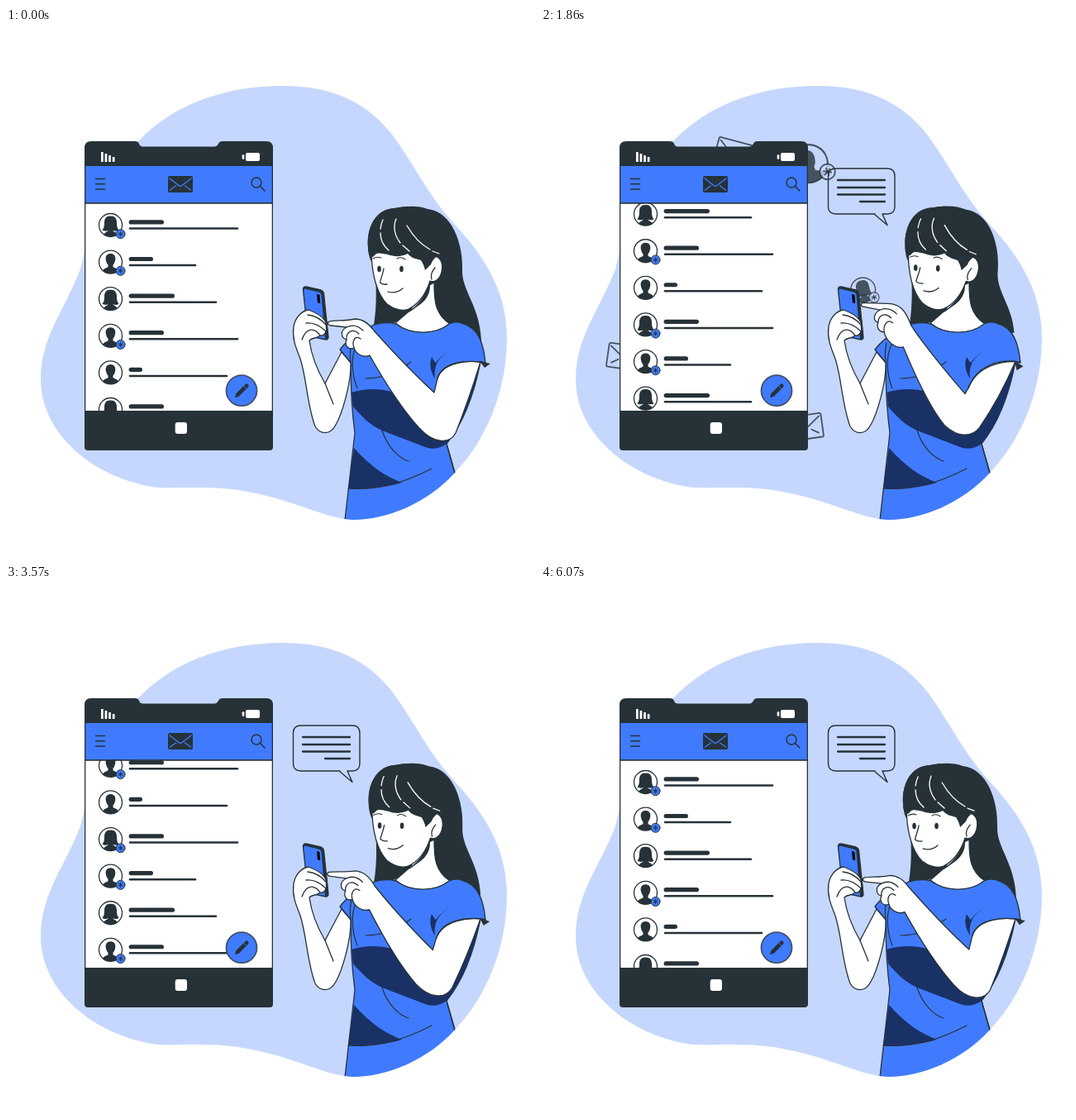
An HTML page with a canvas that plays this animation: 640 px wide and 640 px high, repeating every 6210 ms.

```html
<!DOCTYPE html>
<html lang="en">
<head>
<meta charset="utf-8">
<title>Mail app</title>
<style>
html, body { margin: 0; width: 100%; height: 100%; overflow: hidden; background: #fff; }
canvas { display: block; width: 640px; height: 640px; }
</style>
</head>
<body>
<canvas id="stage"></canvas>
<script>
const LOOP = 6210, FPS = 14, LAST = 85;
const DARK = '#263238', BLUE = '#407bff', PALE = '#c6d7ff', NAVY = '#1a3166', WHITE = '#fff';

const canvas = document.getElementById('stage');
const dpr = window.devicePixelRatio || 1;
canvas.width = canvas.height = 640 * dpr;
const c = canvas.getContext('2d');
c.lineCap = c.lineJoin = 'round';

const lerp = (a, b, k) => a + (b - a) * k;
const clamp = v => Math.max(0, Math.min(1, v));
const easeSine = v => (1 - Math.cos(Math.PI * clamp(v))) / 2;

function fill(d, color) {
  c.fillStyle = color;
  c.fill(typeof d === 'string' ? new Path2D(d) : d);
}
function line(d, width = 1.3, color = DARK) {
  c.strokeStyle = color;
  c.lineWidth = width;
  c.stroke(typeof d === 'string' ? new Path2D(d) : d);
}
function shape(d, color, width = 1.3) {
  fill(d, color);
  line(d, width);
}
function circle(x, y, r) {
  const p = new Path2D();
  p.arc(x, y, r, 0, 7);
  return p;
}
function box(x, y, w, h, r) {
  const p = new Path2D();
  p.roundRect(x, y, w, h, r);
  return p;
}
function group(draw, x = 0, y = 0, turn = 0, size = 1) {
  c.save();
  c.translate(x, y);
  c.rotate(turn * Math.PI / 180);
  c.scale(size, size);
  draw();
  c.restore();
}
// Blend two paths that share the same commands
function blend(a, b, k) {
  const to = b.match(/-?[\d.]+/g);
  let i = 0;
  return a.replace(/-?[\d.]+/g, n => lerp(+n, +to[i++], k).toFixed(2));
}

const BLOB = new Path2D('M335 70C395 70 437 90 468 130C497 170 509 200 544 239C585 283 606 325 606 375C606 440 580 500 543 538C510 575 460 595 420 595C388 594 352 573 302 563C258 553 225 557 185 556C118 549 42 498 42 425C42 374 70 343 90 292C105 230 115 185 160 137C200 95 260 70 335 70Z');

function badge(x, y, r, color, width) {
  shape(circle(x, y, r), color, width);
  for (let i = 0; i < 3; i++) {
    const a = Math.PI * (i / 3 + .5), dx = Math.cos(a) * r * .5, dy = Math.sin(a) * r * .5;
    line(`M${x - dx} ${y - dy}L${x + dx} ${y + dy}`, width);
  }
}

// Avatar drawn at radius 14
function avatar(female, ground) {
  const rim = circle(0, 0, 14);
  if (ground) fill(rim, ground);
  c.save();
  c.clip(rim);
  if (female) {
    fill('M0 -11C5 -11.500 7.500 -8 7.500 -3C7.500 1 8 4 10 6C8 7.500 5 7.500 3 6.500L-3 6.500C-5 7.500 -8 7.500 -10 6C-8 4 -7.500 1 -7.500 -3C-7.500 -8 -5 -11.500 0 -11Z', DARK);
    fill('M-9 14C-9 10 -6 9 -3 7L-3 5L3 5L3 7C6 9 9 10 9 14Z', DARK);
  } else {
    fill('M0 -10C5 -10 6.5 -6 5.6 -2C5 1 4 2.5 3 3.5L3 6C6 8 10 8 10 14L-10 14C-10 8 -6 8 -3 6L-3 3.5C-4 2.5 -5 1 -5.6 -2C-6.5 -6 -5 -10 0 -10Z', DARK);
  }
  c.restore();
  line(rim, 1.3);
}

const ROWS = [
  { female: true, star: true, title: 191, text: 281 },
  { female: false, star: true, title: 178, text: 230 },
  { female: true, star: false, title: 204, text: 255 },
  { female: false, star: true, title: 191, text: 281 },
  { female: false, star: false, title: 165, text: 268 }
];
const STEP = 44.6, SPAN = STEP * ROWS.length, PAUSE = 102.7;

function list(t) {
  const scroll = PAUSE * easeSine(t / 1900) + (SPAN - PAUSE) * easeSine((t - 2340) / 2720);
  c.save();
  c.beginPath();
  c.rect(96, 212, 226, 251);
  c.clip();
  for (let i = 0; i < 12; i++) {
    const y = 238.5 + i * STEP - scroll, row = ROWS[i % 5];
    if (y < 190 || y > 485) continue;
    group(() => avatar(row.female, WHITE), 126.5, y);
    if (row.star) badge(138.6, y + 10.7, 5.5, BLUE, 1);
    line(`M151.2 ${y - 3.6}H${row.title - 2.6}`, 5.2);
    line(`M150 ${y + 4}H${row.text - 1}`, 2.5);
  }
  c.restore();
}

function bigPhone(t) {
  fill('M95 145Q95 137 103 137H156Q160 137 161 140Q162 143.500 166 143.500H252Q255 143.500 257 140Q258 137 262 137H315Q323 137 323 145V507Q323 511 319 511H99Q95 511 95 507Z', DARK);
  fill('M96.300 212H321.700V463H96.300Z', WHITE);
  list(t);
  fill('M96.300 167H321.700V211.500H96.300Z', BLUE);
  line('M96 212H322', 1.3);
  for (let i = 0; i < 4; i++) fill(box(115 + i * 4.6, 150 + i * 2, 2.7, 12 - i * 2, .6), WHITE);
  fill(box(290, 151, 17, 10, 2), WHITE);
  fill(box(285.7, 153.3, 2.6, 5.4, 1), WHITE);
  line('M108.500 182.500H119.500M108.500 188.700H119.500M108.500 195H119.500', 1.5);
  fill(box(196, 179, 30, 20, 2), DARK);
  line('M198 182L209 190.500Q211 192 213 190.500L224 182M198.500 196L205.500 191M223.500 196L216.500 191', 1.4, BLUE);
  line(circle(303, 187, 6), 1.4);
  line('M307.300 191.300L313 197', 1.6);
  fill(box(204.7, 477, 14.3, 14, 3), WHITE);
  fill(circle(285, 438.7, 18.5), BLUE);
  line(circle(285, 438.7, 18.5), 1.8, '#40516c');
  group(() => {
    fill('M-7 -2.400H9Q11 -2.400 11 0Q11 2.400 9 2.400H-7L-11.500 0Z', DARK);
    line('M6 -2.500V2.500', .8, BLUE);
  }, 285, 439, -45);
}

function envelope() {
  line(box(-21.5, -14.5, 43, 29, 2), 1.8);
  line('M-19 -11L-3 1Q0 3 3 1L19 -11M-16 9L-8 4M16 9L8 4', 1.8);
}
function contact(female) {
  group(() => avatar(female), 0, 0, 0, 23 / 14);
  badge(18, 17, 9.3, PALE, 1.8);
}

// Start and end poses: x, y, turn, and what to draw
const FLOATERS = [
  [[233, 151, 15], [235, 107, -2], envelope],
  [[102, 398, 8], [52, 431, -18], envelope],
  [[319, 483, -8], [366, 523, 20], envelope],
  [[324, 164, -20], [386, 116, 0], () => contact(false)]
];

function floaters(t) {
  if (t < 1300 || t > 3250) return;
  const k = (t - 1860) / 1070;
  c.globalAlpha = clamp(.8 - .4 * k);
  for (const [a, b, draw] of FLOATERS) {
    group(draw, lerp(a[0], b[0], k), lerp(a[1], b[1], k), lerp(a[2], b[2], k));
  }
  if (t > 1680) {
    group(() => contact(true), lerp(390, 531, k), lerp(317, 306, k), lerp(-10, 0, k), .65 * clamp((t - 1600) / 240));
  }
  c.globalAlpha = 1;
}

function bubble(t) {
  const size = clamp((t - 670) / 725);
  if (!size) return;
  group(() => {
    line('M-15 -14H-62Q-71.500 -14 -71.500 -23V-60Q-71.500 -69 -62 -69H0Q9 -69 9 -60V-23Q9 -14 0 -14H-6L0 -.500L-16 -14', 1.4);
    line('M-60 -55H-3M-60 -46H-3M-60 -37.500H-3M-33 -29H-3', 2.3);
  }, 419, 239, 0, size);
}

function backHair(k) {
  fill(blend(
    'M438 265C436 240 448 219 470 218C485 215 500 215 510 219C540 222 553 262 552 292C551 318 573 335 575 378L520 374L500 300L490 345C475 358 455 361 445 359C449 335 448 310 446 288C440 282 438 272 438 265Z',
    'M441 263C440 240 453 219 475 217C490 214 505 215 515 220C544 224 555 262 553 292C549 318 570 335 572 367L520 374L500 300L490 345C475 358 455 361 446 359C450 335 449 310 448 288C442 280 441 272 441 263Z', k), DARK);
}

function head() {
  shape('M442 268C442 298 449 322 461 334C470 341 480 343 487 340C499 334 508 322 513 306C528 312 535 276 517 276L505 262Z', WHITE);
  fill('M438 266C436 240 448 219 470 218C500 212 530 222 536 270L525 275C520 276 516 281 514 286L507 293C506 288 504 284 502 281C495 279 490 278 486 273C478 277 470 277 462 274C455 273 450 271 447 274L444 277C440 276 438 271 438 266Z', DARK);
  line('M456 232C454 236 453.500 239 453 243M453 248C453 257 457 264 463 269M472 231C468 240 470 251 477 260M480 263L488 270M485 239C492 251 502 262 513 268M516 270L524 273', 1.3, WHITE);
  line('M444 279Q449 276 454 278M473 279Q478 276 483 280', 1.1);
  for (const x of [451.5, 478.5]) {
    const eye = new Path2D();
    eye.ellipse(x, 291.5, 2.3, 3.8, 0, 0, 7);
    fill(eye, DARK);
  }
  line('M457 291C456 298 453 304 452.500 308Q456 311 461 310M462 319Q472 322 480 315M515 304C513 298 516 294 519 290', 1.3);
}

function torso(k) {
  shape('M486 344C498 338 508 324 512 311L518 308C518 330 519 346 537 358C522 373 490 373 471 357Z', WHITE);
  fill('M485 344C499 337 508 324 513 309C514 327 503 335 485 344Z', DARK);
  c.save();
  c.clip(BLOB);
  shape('M445 359C430 365 412 378 404 389L417 405C417 430 418 460 422 490L409.500 600H560L533 503C552 480 566 445 574 404L580 405C578 385 573 362 551 357C546 355 540 356 536 358C520 371 490 372 472 358C460 355 452 357 445 359Z', BLUE);
  // Waist shadow, running under the arm to the back
  fill('M418 441C440 434 468 436 488 450L540 440L574 404C566 445 552 480 533 503C526 508 518 510 510 508C494 502 474 494 455 487C440 480 430 470 420 458Z', NAVY);
  fill('M421 508C440 530 460 543 479 550C455 557 430 558 414 557Z', NAVY);
  line('M414 557C450 560 482 550 515 533M455 487C462 508 475 520 487 524M435 424C455 424 475 415 490 404M424 383C417 398 418 418 425 436', 1.2);
  line('M533 503L544 541', 1.3);
  line('M418 381C416 390 416 397 417 405', 1.2);
  fill('M537 391C524 397 517 408 519 424C513 415 512 406 515 398C518 403 519 404 520 405C524 399 530 394 537 391Z', NAVY);
  c.restore();
  fill(blend('M573 403L586 406L579 411Z', 'M573 403L583 410L575 415Z', k), DARK);
}

function leftArm() {
  shape('M363 313L381 317Q384 318 384.500 321L390 374Q390 377 387 377L368 373Q366 372 365 369L359.500 317Q359 313 363 313Z', DARK);
  fill('M361.500 315.500L378 319.500Q381 320 381.500 323L386 376L368 372.500Q366 371 365.500 369L360.300 317Z', BLUE);
  fill('M376 322L379.500 323L380.200 333L377 332.500Z', '#000');
  shape('M348 361C350 350 358 342 366 341C374 344 381 347 385 353C389 357 389 364 387 367C386 371 383 373 380 372C376 376 371 374 367 378C370 400 379 418 386 430L406 392L417 405C418 430 406 468 399 480C392 493 380 492 374 482C364 455 364 425 356 400C350 385 346 375 348 361Z', WHITE);
  line('M365 347C375 348 381 352 387 359M363 357C372 356 380 360 387 367M358 377C364 361 374 363 380 372M386 430L396 455', 1.3);
  line('M387.500 355L388.700 375', 2.2);
}

function rightArm(k) {
  shape(blend(
    'M574 404C555 402 528 404 522 424L518 441C495 420 462 385 445 366C438 356 430 352 422 352C410 355 398 353 391 355C388 357 390 360 393 360L412 362C404 366 405 375 412 377C409 384 414 390 421 387C424 396 434 399 440 396C458 428 480 462 500 484C518 504 537 503 544 490C556 460 566 430 574 404Z',
    'M574 403C553 402 528 408 516 438L512 443C492 418 464 385 448 358C442 340 436 332 424 330C412 329 400 329 389 328C385 330 387 333 391 333L410 337C402 341 400 350 407 352C405 358 408 364 414 364C416 376 428 386 438 384C452 420 468 458 486 480C502 494 518 494 528 482C548 455 562 430 574 403Z', k), WHITE);
  line(blend(
    'M412 362C420 358 427 361 432 366M412 377C411 367 420 363 427 370M421 387C418 378 423 371 429 376',
    'M410 337C418 334 425 337 430 342M407 352C408 343 416 340 423 347M414 364C413 355 419 348 425 353', k));
  line(blend('M580 405C560 401 528 404 522 424', 'M580 404C560 402 528 408 516 438', k), 1.4);
}

function render(t) {
  c.setTransform(dpr, 0, 0, dpr, 0, 0);
  c.clearRect(0, 0, 640, 640);
  fill(BLOB, PALE);

  // Two taps per loop
  const phase = t / 1000 * FPS / 43 % 1;
  const u = 1 - Math.abs(1 - 2 * phase);
  const k = u - .05 * Math.sin(2 * Math.PI * u);

  floaters(t);
  bigPhone(t);
  bubble(t);
  backHair(k);
  torso(k);
  leftArm();
  group(() => {
    c.translate(-500, -350);
    head();
  }, 500, 350, 2 * k);
  rightArm(k);
}

const start = performance.now();
function tick(now) {
  const t = Math.max(0, now - start) % LOOP;
  const step = Math.min(LAST, Math.floor((t + 5) * FPS / 1000));
  render(step * 1000 / FPS);
  requestAnimationFrame(tick);
}
render(0);
requestAnimationFrame(tick);
</script>
</body>
</html>
```
